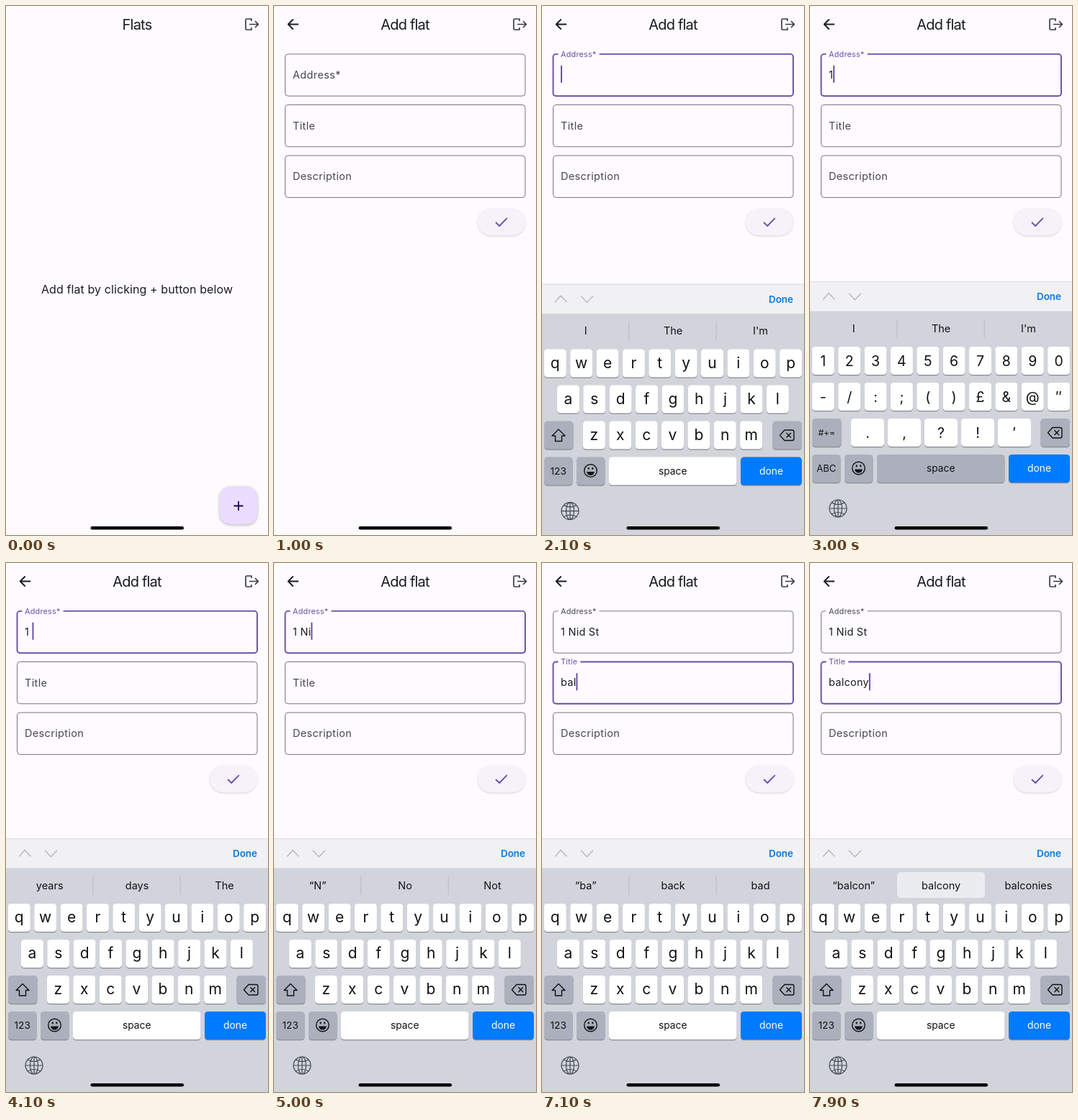
These frames come from a looping animation (364x736 px, 8000 ms). An HTML page with a canvas:

```html
<!DOCTYPE html>
<html lang="en">
<head>
<meta charset="utf-8">
<title>Add flat</title>
<style>
html, body { margin: 0; width: 100%; height: 100%; overflow: hidden; background: #fdfbfe; }
canvas { display: block; width: 364px; height: 736px; }
</style>
</head>
<body>
<canvas id="stage"></canvas>
<script>
const W = 364, H = 736, LOOP = 8000, STEP = 100;
const PAPER = '#fdfbfe', INK = '#1c1b1f', PURPLE = '#6750a4', GREY = '#49454f';
const KEY = '#ffffff', DARK = '#abb0bc', BLACK = '#111214';

const canvas = document.getElementById('stage');
const ctx = canvas.getContext('2d');
const dpr = window.devicePixelRatio || 1;
canvas.width = W * dpr;
canvas.height = H * dpr;

const clamp = v => Math.max(0, Math.min(1, v));
const easeOut = u => 1 - (1 - clamp(u)) ** 3;

// ---- timeline ----
const PAGE = 800, FOCUS = 1800, NEXT = 6300;
const address = { text: '1 Nid St', times: [2900, 3100, 4800, 5000, 5100, 5300, 5600, 5700] };
const title = { text: 'balcony', times: [6700, 6900, 7100, 7300, 7500, 7700, 7900] };
const layouts = [[0, 'abc'], [2600, 'num'], [3100, 'abc'], [4600, 'ABC'], [4800, 'abc'], [5500, 'ABC'], [5600, 'abc']];
const hints = [
  [0, "I,The,I'm"], [3200, 'years,days,The'], [4900, '“N”,No,Not'], [5100, '“Ni”,Nice,Night'],
  [5200, '“Nid”,Nice,Night'], [5400, 'and,The,I'], [5700, '“S”,School,Style'], [5800, '“St”,Street,Style'],
  [NEXT, "I,The,I'm"], [6800, '“b”,but,be'], [7000, '“ba”,back,bad'], [7200, '“bal”,ball,balance'],
  [7400, '“balc”,balcony,balance'], [7600, '“balco”,balcony,balconies'], [7800, '“balcon”,balcony,balconies']
];
const latest = (list, t) => list.filter(e => e[0] <= t).pop()[1];
const typed = (f, t) => f.text.slice(0, f.times.filter(k => k <= t).length);

function caretAlpha(t) {
  const resets = [FOCUS, NEXT, ...address.times, ...title.times].filter(k => k <= t);
  const p = (t - Math.max(...resets)) % 1000;
  return p < 825 ? clamp((600 - p) / 150) : clamp((p - 850) / 150);
}

// ---- drawing helpers ----
// y is the middle of the capitals
function text(s, x, y, size, color = BLACK, align = 'center', spacing = 0, weight = 400) {
  ctx.font = `${weight} ${size}px Inter, Roboto, sans-serif`;
  ctx.letterSpacing = spacing + 'px';
  ctx.textAlign = align;
  ctx.fillStyle = color;
  ctx.fillText(s, x, y + size * 0.364);
}

function stroke(d, color = BLACK, width = 1.4) {
  ctx.strokeStyle = color;
  ctx.lineWidth = width;
  ctx.stroke(new Path2D(d));
}

function fill(d, color = BLACK) {
  ctx.fillStyle = color;
  ctx.fill(new Path2D(d));
}

function box(x, y, w, h, r, color) {
  ctx.beginPath();
  ctx.roundRect(x, y, w, h, r);
  ctx.fillStyle = color;
  ctx.fill();
}

function raised(x, y, w, h, r, color, alpha, blur) {
  ctx.save();
  ctx.shadowColor = `rgba(0,0,0,${alpha})`;
  ctx.shadowBlur = blur * dpr;
  ctx.shadowOffsetY = dpr;
  box(x, y, w, h, r, color);
  ctx.restore();
}

function shifted(x, y, draw) {
  ctx.save();
  ctx.translate(x, y);
  draw();
  ctx.restore();
}

// ---- pages ----
function header(name) {
  ctx.fillStyle = PAPER;
  ctx.fillRect(0, 0, W, H);
  text(name, W / 2, 25.5, 20, INK, 'center', -0.8);
  stroke('M341 21V18H334.5Q333 18 333 19.5V31.5Q333 33 334.5 33H341V30M338 25.5H350M346 21L350.5 25.5L346 30', '#3d3a42', 1.7);
}

function homePage() {
  header('Flats');
  text('Add flat by clicking + button below', W / 2, 394.5, 16, INK, 'center', 0.1);
  raised(297, 669, 52, 52, 15, '#eaddff', 0.3, 4);
  stroke('M316.5 695.5H329.5M323 689V702', '#21005d', 1.8);
}

function field(y, label, value, up, focused, t) {
  ctx.beginPath();
  ctx.roundRect(15.5, y + 0.5, 333.5, 58.3, 4);
  ctx.strokeStyle = focused ? PURPLE : '#79747e';
  ctx.lineWidth = focused ? 1.9 : 1;
  ctx.stroke();
  const size = 14.5 - 3.7 * up;
  if (up) {
    ctx.font = '10.8px Inter, Roboto, sans-serif';
    ctx.letterSpacing = '0.25px';
    ctx.fillStyle = PAPER;
    ctx.fillRect(22.5, y - 2, (ctx.measureText(label).width + 7.5) * up, 5);
  }
  text(label, 26, y + 29.5 - 29 * up, size, focused ? PURPLE : GREY, 'left', 0.35 - 0.1 * up);
  text(value, 26, y + 29, 14.5, INK, 'left', 0.25);
  if (focused) {
    ctx.globalAlpha = caretAlpha(t);
    box(26 + ctx.measureText(value).width, y + 16, 2, 24.5, 1, PURPLE);
    ctx.globalAlpha = 1;
  }
}

function formPage(t) {
  header('Add flat');
  stroke('M34 25.5H20M26.7 18.5L19.7 25.5L26.7 32.5', INK, 1.9);
  const lift = start => t < start ? 0 : easeOut((t - start + 50) / 200);
  field(66.4, 'Address*', typed(address, t), lift(FOCUS), t >= FOCUS && t < NEXT, t);
  field(137, 'Title', typed(title, t), lift(NEXT), t >= NEXT, t);
  field(207.6, 'Description', '', 0, false, t);
  raised(282.5, 281.5, 67, 38, 19, '#f7f2fa', 0.16, 2);
  stroke('M308 301L313.2 306L323.8 295.2', PURPLE, 1.8);
}

// ---- keyboard ----
function key(x, y, w, color = KEY) {
  box(x, y + 1.2, w, 39, 4.5, '#898b91');
  box(x, y, w, 39, 4.5, color);
}

function keyRow(chars, x, y, pitch = 36.37, w = 31) {
  [...chars].forEach((c, i) => {
    const mid = x + i * pitch;
    key(mid - w / 2, y, w);
    text(c, mid, y + (/[a-z]/.test(c) ? 18.8 : 19.5), /[a-z]/i.test(c) ? 21 : 19.5);
  });
}

function faceIcon() {
  stroke('M58.7 643a8.8 8.8 0 1 0 17.6 0a8.8 8.8 0 1 0 -17.6 0');
  fill('M62 644.5H73Q72 649.5 67.5 649.5Q63 649.5 62 644.5Z');
  stroke('M64.7 638.5V641.3M70.3 638.5V641.3', BLACK, 2);
}

function globeIcon() {
  stroke('M27 699a12 12 0 1 0 24 0a12 12 0 1 0 -24 0M33.5 699a5.5 12 0 1 0 11 0a5.5 12 0 1 0 -11 0' +
    'M39 687V711M27 699H51M30 691Q39 696 48 691M30 707Q39 702 48 707', '#454951', 1.2);
}

function suggestions(t) {
  const words = latest(hints, t).split(',');
  if (t >= 7800) {
    box(121, 430, 122, 36, 5, '#ebecf0');
  } else {
    stroke('M120.8 436V461.5M242.2 436V461.5', '#b7bac2', 1);
  }
  words.forEach((word, i) => text(word, 60.7 + i * 121.4, 448.5, 14.5));
}

function keyboard(t) {
  const layout = latest(layouts, t), num = layout === 'num', caps = layout === 'ABC';
  ctx.fillStyle = '#f1f1f4';
  ctx.fillRect(0, 383, W, 42);
  ctx.fillStyle = '#d1d4db';
  ctx.fillRect(0, 424.5, W, H);
  stroke('M0 383.5H364', '#dcdce0', 1);
  stroke('M18 408.5L26 399.5L34.5 408.5M54 399.8L62.4 408.8L71 399.8', '#b8b8bc', 1.4);
  text('Done', 332, 404.5, 13.5, '#0b79e0', 'center', 0, 600);
  suggestions(t);

  if (num) {
    keyRow('1234567890', 18.3, 474);
    keyRow('-/:;()£&@″', 18.3, 524);
    keyRow('.,?!′', 80, 574, 51, 46);
  } else {
    const cased = s => caps ? s.toUpperCase() : s;
    keyRow(cased('qwertyuiop'), 18.3, 474);
    keyRow(cased('asdfghjkl'), 36.4, 524);
    keyRow(cased('zxcvbnm'), 72.4, 574);
  }

  key(3, 574, 40.5, caps ? KEY : DARK);
  if (num) {
    text('#+=', 23.2, 593.5, 12);
  } else {
    const arrow = 'M23 585.5L32 594.5H27.5V602H18.5V594.5H14Z';
    stroke(arrow);
    if (caps) fill(arrow);
  }
  key(320.5, 574, 40.5, DARK);
  stroke('M337 586.5H347.5Q350 586.5 350 589V598.5Q350 601 347.5 601H337L330.5 593.8ZM339.5 590.3L346 597M346 590.3L339.5 597');

  key(3, 624, 39.5, DARK);
  text(num ? 'ABC' : '123', 22.7, 643.5, num ? 13 : 13.7);
  key(48, 624, 39.5, DARK);
  faceIcon();
  key(93, 624, 177.5, t === 3000 ? DARK : KEY);
  text('space', 181.7, 643, 13.8);
  key(276, 624, 85, '#007aff');
  text('done', 318.5, 643, 13.9, '#ffffff');
  globeIcon();
}

function render(t) {
  ctx.setTransform(dpr, 0, 0, dpr, 0, 0);
  ctx.lineJoin = 'round';
  const slide = t < PAGE ? 0 : easeOut((t - 750) / 250);
  if (slide < 1) shifted(-slide * W / 3, 0, homePage);
  if (slide > 0) shifted((1 - slide) * W, 0, () => formPage(t));
  if (t > FOCUS) {
    // critically damped rise
    const s = (t - 1850) * 0.0265;
    shifted(0, (H - 383) * (1 + s) * Math.exp(-s), () => keyboard(t));
  }
  box(117.5, 724, 129.5, 4.6, 2.3, '#000000');
}

function frame(now) {
  render(Math.floor(now % LOOP / STEP) * STEP);
  requestAnimationFrame(frame);
}
requestAnimationFrame(frame);
</script>
</body>
</html>
```
